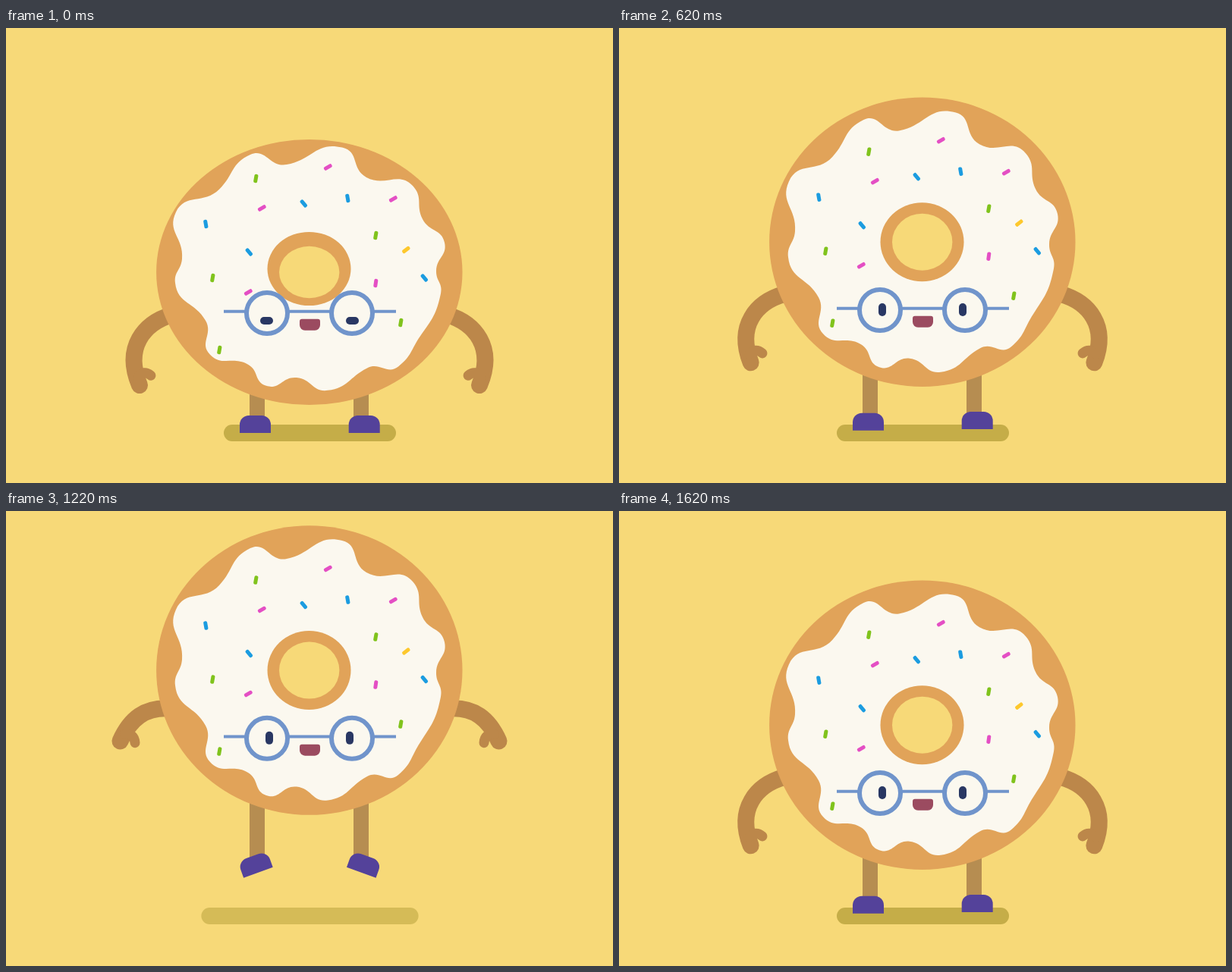
Recreate the animation shown at these times as an HTML page with a canvas. Size 800 px wide and 600 px high, loop 1.64 s.

```html
<!DOCTYPE html>
<html lang="en">
<head>
<meta charset="utf-8">
<title>Jumping donut</title>
<style>
  html, body { margin: 0; width: 100%; height: 100%; overflow: hidden; background: #f7d978; }
  canvas { display: block; }
</style>
</head>
<body>
<canvas id="stage" width="800" height="600"></canvas>
<script>
const ctx = document.getElementById('stage').getContext('2d');
const LOOP = 1640, CYCLE = 1000;
const BG = '#f7d978', DOUGH = '#e1a359', ICING = '#fbf8ef', ARM = '#bc874a', LEG = '#b68d51',
      SHOE = '#54429a', FRAME = '#7094cb', EYE = '#293763', MOUTH = '#9b4b60', SHADOW = '#c5ad48',
      GREEN = '#80c31c', PINK = '#e44fc4', BLUE = '#1b9ce0', YELLOW = '#fdc82d';

// Alternating crests and dips of the icing, around the donut centre
const WAVES = [
  [-78,-161], [-30,-147], [43,-171], [75,-129], [136,-117], [149,-70], [178,-37], [167,3],
  [173,35], [146,95], [117,138], [76,140], [24,171.5], [-17,153.5], [-57,165], [-81,135],
  [-131,121], [-137,73], [-177,20], [-168,-14], [-176,-80], [-119,-112]
];

// Sprinkles that share a colour and a tilt
const SPRINKLES = [
  { color: GREEN, tilt: 10, spots: [[-71,-119], [-128,12], [-119,107], [87,-44], [120,71]] },
  { color: PINK, tilt: 60, spots: [[24,-134], [-63,-80], [110,-92], [-81,31]] },
  { color: PINK, tilt: 8, spots: [[87,19]] },
  { color: BLUE, tilt: -10, spots: [[-137,-59], [50,-93]] },
  { color: BLUE, tilt: -40, spots: [[-80,-22], [-8,-86], [151,12]] },
  { color: YELLOW, tilt: 52, spots: [[127,-25]] }
];

// Left arm from shoulder to hand, y relative to the glasses
const ARM_DOWN = [[218,-20], [181,-9], [154,23], [175,73]];
const ARM_UP = [[212,-43], [184,-46], [166,-36], [146,-9]];

const clamp = v => Math.min(1, Math.max(0, v));
const mix = (a, b, k) => a + (b - a) * k;

// cubic-bezier(.25, .1, .25, 1) running from start to end
function ease(t, start, end) {
  const x = clamp((t - start) / (end - start));
  let lo = 0, hi = 1;
  for (let i = 0; i < 24; i++) {
    const u = (lo + hi) / 2, v = 1 - u;
    if (.75 * v * u + u ** 3 < x) lo = u; else hi = u;
  }
  const v = 1 - lo;
  return .3 * v * v * lo + 3 * v * lo * lo + lo ** 3;
}

function ellipse(color, x, y, rx, ry) {
  ctx.fillStyle = color;
  ctx.beginPath();
  ctx.ellipse(x, y, rx, ry, 0, 0, 7);
  ctx.fill();
}

function box(color, x, y, w, h, radius, degrees = 0) {
  ctx.save();
  ctx.translate(x, y);
  ctx.rotate(degrees * Math.PI / 180);
  ctx.fillStyle = color;
  ctx.beginPath();
  ctx.roundRect(-w / 2, -h / 2, w, h, radius);
  ctx.fill();
  ctx.restore();
}

function stroke(color, width, cap, path) {
  ctx.strokeStyle = color;
  ctx.lineWidth = width;
  ctx.lineCap = cap;
  ctx.beginPath();
  path();
  ctx.stroke();
}

function drawShadow(spread) {
  ctx.globalAlpha = 1 - .4 * spread;
  box(SHADOW, 400.5, 534, 227 + 70 * spread, 22, 11);
  ctx.globalAlpha = 1;
}

function drawLeg(legX, shoeX, hipY, footY, tilt) {
  stroke(LEG, 20, 'butt', () => { ctx.moveTo(legX, hipY); ctx.lineTo(legX, footY - 2); });
  box(SHOE, shoeX, footY, 41, 23, [12, 12, 0, 0], tilt);
}

// The thumb is drawn in the frame of the hand, which points along the arm's end
function drawArm(faceY, lift, squash, mirrored) {
  const [shoulder, upper, lower, hand] =
    ARM_DOWN.map(([x, y], i) => [mix(x, ARM_UP[i][0], lift), mix(y, ARM_UP[i][1], lift)]);
  ctx.save();
  if (mirrored) ctx.transform(-1, 0, 0, 1, 800, 0);
  ctx.translate(squash, faceY + 22 * squash);
  stroke(ARM, 22, 'round', () => { ctx.moveTo(...shoulder); ctx.bezierCurveTo(...upper, ...lower, ...hand); });
  ctx.translate(...hand);
  ctx.rotate(Math.atan2(hand[1] - lower[1], hand[0] - lower[0]));
  stroke(ARM, 13, 'round', () => { ctx.moveTo(-11, -2); ctx.quadraticCurveTo(-17, -13, -6, -18.7); });
  ctx.restore();
}

// Every crest and dip is passed at a right angle to its radius
function drawIcing(y, scale) {
  ctx.save();
  ctx.translate(400, y);
  ctx.scale(1, scale);
  ctx.fillStyle = ICING;
  ctx.beginPath();
  ctx.moveTo(...WAVES[0]);
  WAVES.forEach(([x0, y0], i) => {
    const [x1, y1] = WAVES[(i + 1) % WAVES.length];
    const handle = .46 * Math.hypot(x1 - x0, y1 - y0);
    const h0 = handle / Math.hypot(x0, y0), h1 = handle / Math.hypot(x1, y1);
    ctx.bezierCurveTo(x0 - y0 * h0, y0 + x0 * h0, x1 + y1 * h1, y1 - x1 * h1, x1, y1);
  });
  ctx.fill();
  ctx.restore();
}

function drawFace(y, squash) {
  for (const side of [-1, 1]) {
    const x = 400 + 56 * side;
    ellipse(ICING, x, y, 27, 27);
    stroke(FRAME, 6, 'butt', () => ctx.arc(x, y, 27, 0, 7));
    box(EYE, 400 + side * mix(53, 56.5, squash), y + mix(-.5, 10, squash),
        mix(10, 17, squash), mix(17, 10, squash), 5);
  }
  stroke(FRAME, 4, 'butt', () => {
    for (const [from, to] of [[287, 316], [372, 428], [484, 514]]) {
      ctx.moveTo(from, y - 2.3);
      ctx.lineTo(to, y - 2.3);
    }
  });
  box(MOUTH, 400.5, y + 15.3, 27, 15, [3, 3, 7, 7]);
}

function draw(time) {
  const t = time % LOOP % CYCLE;
  const rising = t < 440;
  const lift = rising ? ease(t, 84, 334) : 1 - ease(t, 440, 686);
  const squash = t < 500 ? 1 - ease(t, 84, 170) : ease(t, 700, 950);
  const kick = 40 * ease(t, 250, 420) * lift;
  const spread = rising ? lift * (1 - ease(t, 334, 434)) : 0;

  const faceY = 376 - 90 * lift;
  const centreY = faceY - 89.8 + 35.8 * squash;
  const toppingY = faceY - 89.8 + 31.3 * squash;
  const toppingScale = 1 - .065 * squash;
  const footY = 522.5 - (rising ? Math.max(0, 90 * lift - 19.5) : 70.5 * lift);
  const tilt = 20 * clamp((518.5 - footY) / 30);

  ctx.fillStyle = BG;
  ctx.fillRect(0, 0, 800, 600);
  drawShadow(spread);
  drawLeg(331, 328.5, centreY + 120, footY, -tilt);
  drawLeg(468, 472.2, centreY + 120, footY - kick, tilt);
  drawArm(faceY, lift, squash, false);
  drawArm(faceY, lift, squash, true);

  ellipse(DOUGH, 399.8, centreY, 201.7, 190.8 - 15.8 * squash);
  drawIcing(toppingY, toppingScale);
  ellipse(DOUGH, 399.5, toppingY, 55, 52 * toppingScale);
  ellipse(BG, 399.7, centreY, 39.7, 37.5 - 3.3 * squash);
  for (const { color, tilt, spots } of SPRINKLES)
    for (const [x, y] of spots) box(color, x + 400.3, y + toppingY, 5, 11.5, 2, tilt);
  drawFace(faceY, squash);
}

const begin = performance.now();
function tick() {
  draw(performance.now() - begin);
  requestAnimationFrame(tick);
}
tick();
</script>
</body>
</html>
```
